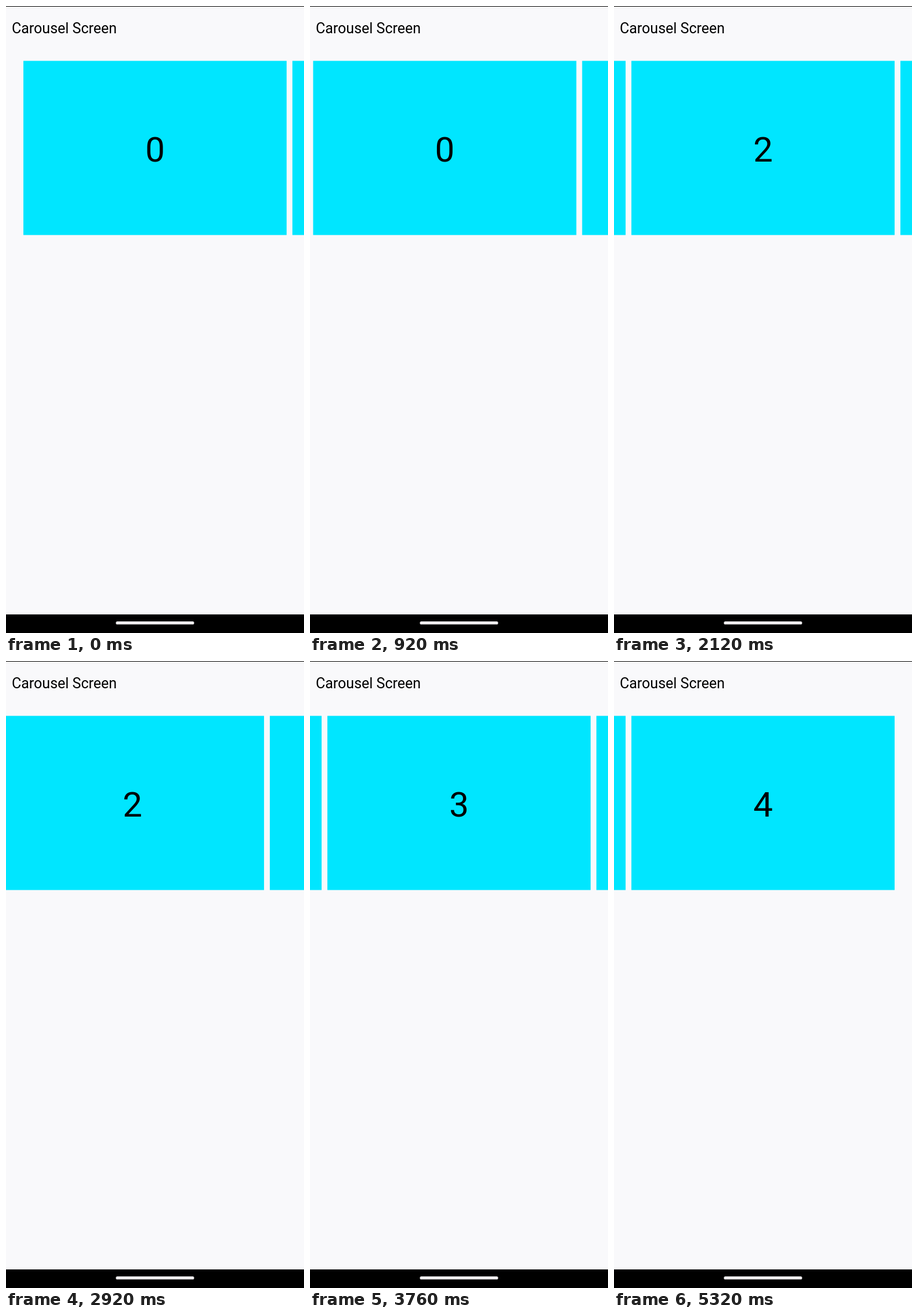
Recreate the animation shown at these times as an HTML page. Size 514 by 1080 pixels, loop 5.52 s.

```html
<!DOCTYPE html>
<html lang="en">
<head>
<meta charset="utf-8">
<title>Carousel Screen</title>
<style>
  html, body { margin: 0; width: 100%; height: 100%; overflow: hidden; background: #f9f9fb; }
  svg { display: block; width: 514px; height: 1080px; font-family: Roboto, sans-serif; }
  .title { font-size: 25px; }
  .digit { font-size: 60px; text-anchor: middle; }
  .card { fill: #00e6ff; }
  .track { animation: swipe 5520ms linear infinite; }

  /* Flings use a short pickup and a long settle; the third swipe is a slow drag first. */
  @keyframes swipe {
    0% { transform: translateX(0); }
    15.942% { transform: translateX(0); animation-timing-function: cubic-bezier(.35, .08, .2, 1); }
    23.551% { transform: translateX(-464px); }
    29.71% { transform: translateX(-464px); animation-timing-function: cubic-bezier(.35, .08, .2, 1); }
    37.681% { transform: translateX(-928px); }
    48.551% { transform: translateX(-928px); animation-timing-function: cubic-bezier(.5, .1, .8, .6); }
    58.696% { transform: translateX(-1114px); animation-timing-function: cubic-bezier(.2, .4, .2, 1); }
    66.667% { transform: translateX(-1392px); }
    79.71% { transform: translateX(-1392px); animation-timing-function: cubic-bezier(.35, .08, .2, 1); }
    86.232%, 100% { transform: translateX(-1856px); }
  }
</style>
</head>
<body>
<svg viewBox="0 0 514 1080">
  <defs>
    <rect id="card" class="card" x="30" y="94.5" width="454" height="300"/>
  </defs>
  <rect width="514" height="1080" fill="#f9f9fb"/>
  <rect width="514" height="1"/>
  <text class="title" x="10" y="47">Carousel Screen</text>
  <g class="track">
    <g><use href="#card"/><text class="digit" x="257" y="268">0</text></g>
    <g transform="translate(464)"><use href="#card"/><text class="digit" x="257" y="268">1</text></g>
    <g transform="translate(928)"><use href="#card"/><text class="digit" x="257" y="268">2</text></g>
    <g transform="translate(1392)"><use href="#card"/><text class="digit" x="257" y="268">3</text></g>
    <g transform="translate(1856)"><use href="#card"/><text class="digit" x="257" y="268">4</text></g>
  </g>
  <rect y="1048" width="514" height="32"/>
  <rect x="189.5" y="1060" width="135" height="5.3" rx="2.6" fill="#eeecee"/>
</svg>
</body>
</html>
```
